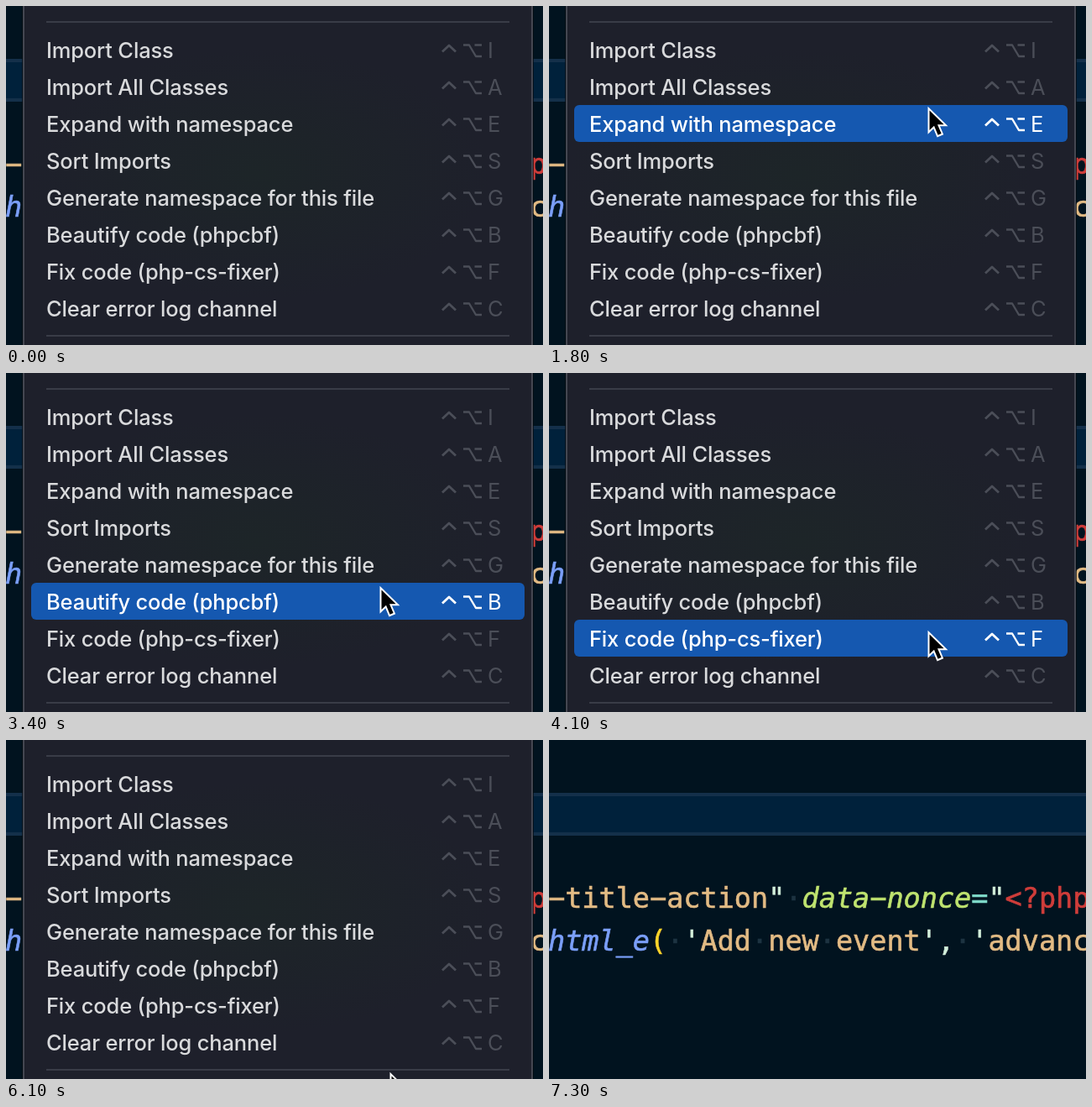
Recreate the animation shown at these times as an HTML page. Size 640 px wide and 404 px high, loop 8 s.

```html
<!DOCTYPE html>
<html lang="en">
<head>
<meta charset="utf-8">
<title>Editor context menu</title>
<style>
  html, body { margin: 0; width: 100%; height: 100%; overflow: hidden; background: #01131f; }
  svg { display: block; }
  text { white-space: pre; }
  .code { font: 33.5px "DejaVu Sans Mono", monospace; color: #e3bb84; }
  .code tspan { fill: currentColor; stroke: currentColor; stroke-width: .6; }
  .code .q { color: #d3efdb; }
  .code .attr { color: #bfe36f; font-style: italic; }
  .code .op { color: #7fdbca; }
  .code .tag { color: #d03d3a; }
  .code .fn { color: #7b9ff9; font-style: italic; }
  .code .par { color: #ffd52a; }
  .code .ws { color: #1d3341; }
  .row { font: 500 25.5px Inter, sans-serif; letter-spacing: -.17px; fill: #d9dadc; }
  .row rect { fill: none; }
  .keys { font-weight: 400; fill: #4b4e58; }
  .keys path { fill: none; stroke: #4b4e58; stroke-width: 2.4; stroke-linejoin: round; }
  .keys .ctrl { stroke-width: 2.8; }
  .on, .on .keys { fill: #fff; }
  .on rect { fill: #1558b0; }
  .on .keys path { stroke: #fff; }
</style>
</head>
<body>
<svg width="640" height="404" viewBox="0 0 640 404">
  <defs>
    <radialGradient id="tint">
      <stop offset="0" stop-color="#1d2528"/>
      <stop offset="1" stop-color="#1d2528" stop-opacity="0"/>
    </radialGradient>
  </defs>
  <rect width="640" height="404" fill="#01131f"/>
  <rect y="63" width="640" height="51" fill="#14304a"/>
  <rect y="67" width="640" height="43" fill="#00213b"/>
  <g id="code" class="code"></g>
  <g id="menu">
    <rect x="19" y="-2" width="610" height="408" fill="#04090f" opacity=".7"/>
    <rect x="20" y="-2" width="608" height="408" fill="#444751"/>
    <rect x="22" y="-2" width="604" height="408" fill="#1e202b"/>
    <ellipse cx="300" cy="200" rx="278" ry="150" fill="url(#tint)"/>
    <path d="M48 19H600M48 393H600" stroke="#393c47" stroke-width="2"/>
    <g id="rows"></g>
  </g>
  <path id="cursor" d="M1.5 3.5V27L7 21.8 11.6 32.8 15.6 31.1 11 20.3H18.6Z"
        fill="#000" stroke="#fff" stroke-width="4" paint-order="stroke"/>
</svg>
<script>
const $ = id => document.getElementById(id);

// Code lines: [class, text] runs; blanks are drawn as dots.
const lines = [
  [['', '−title−action'], ['q', '"'], ['ws', '·'], ['attr', 'data−nonce'],
   ['op', '='], ['q', '"'], ['tag', '&lt;?php']],
  [['fn', 'html_e'], ['par', '('], ['ws', '·'], ['q', "'"], ['', 'Add'], ['ws', '·'],
   ['', 'new'], ['ws', '·'], ['', 'event'], ['q', "',"], ['ws', '·'], ['q', "'"], ['', 'advanc']]
];
$('code').innerHTML = lines.map((runs, i) =>
  `<text x="-1" y="${200 + 51 * i}">` +
  runs.map(([c, s]) => `<tspan class="${c}">${s}</tspan>`).join('') + '</text>').join('');

const items = [
  ['Import Class', 'I'], ['Import All Classes', 'A'], ['Expand with namespace', 'E'],
  ['Sort Imports', 'S'], ['Generate namespace for this file', 'G'],
  ['Beautify code (phpcbf)', 'B'], ['Fix code (php-cs-fixer)', 'F'],
  ['Clear error log channel', 'C']
];
const TOP = 30, ROW = 44;
$('rows').innerHTML = items.map(([label, key], i) => `
  <g class="row" transform="translate(0 ${TOP + ROW * i})">
    <rect x="30" width="588" height="${ROW}" rx="6"/>
    <text x="48" y="32">${label}</text>
    <g class="keys">
      <path class="ctrl" d="M520 24.5L528 17 536 24.5"/>
      <path d="M545 16.5H552L560 30H567M558.5 16.5H567"/>
      <text x="574" y="32">${key}</text>
    </g>
  </g>`).join('');
const rows = [...$('rows').children];

const LOOP = 8000, STEP = 100;
// Pointer path: [ms, x, y]
const path = [
  [0, 446, -45], [100, 447, -30], [300, 449, 12], [600, 451, 46], [1000, 453, 64],
  [1500, 453, 102], [1600, 453, 102], [1800, 452, 121], [2600, 449, 188],
  [3400, 446, 255], [4100, 452, 308], [4700, 458, 350], [5100, 458, 397],
  [6500, 458, 397], [6600, 458, 410], [LOOP, 458, 410]
];
// Menu opacity: [ms, value]
const fade = [[0, 1], [6600, 1], [6900, 0], [LOOP, 0]];

function at(keys, t) {
  const i = Math.max(1, keys.findIndex(k => k[0] >= t));
  const a = keys[i - 1], b = keys[i], p = (t - a[0]) / (b[0] - a[0]);
  return a.slice(1).map((v, j) => v + (b[j + 1] - v) * p);
}

function draw(now) {
  const t = Math.floor(now % LOOP / STEP) * STEP;
  const [x, y] = at(path, t);
  const hover = Math.floor((y - TOP) / ROW);
  rows.forEach((r, i) => r.classList.toggle('on', i === hover));
  $('cursor').setAttribute('transform', `translate(${x} ${y})`);
  $('menu').setAttribute('opacity', at(fade, t)[0]);
}

const start = performance.now();
function tick() {
  draw(performance.now() - start);
  requestAnimationFrame(tick);
}
tick();
</script>
</body>
</html>
```
